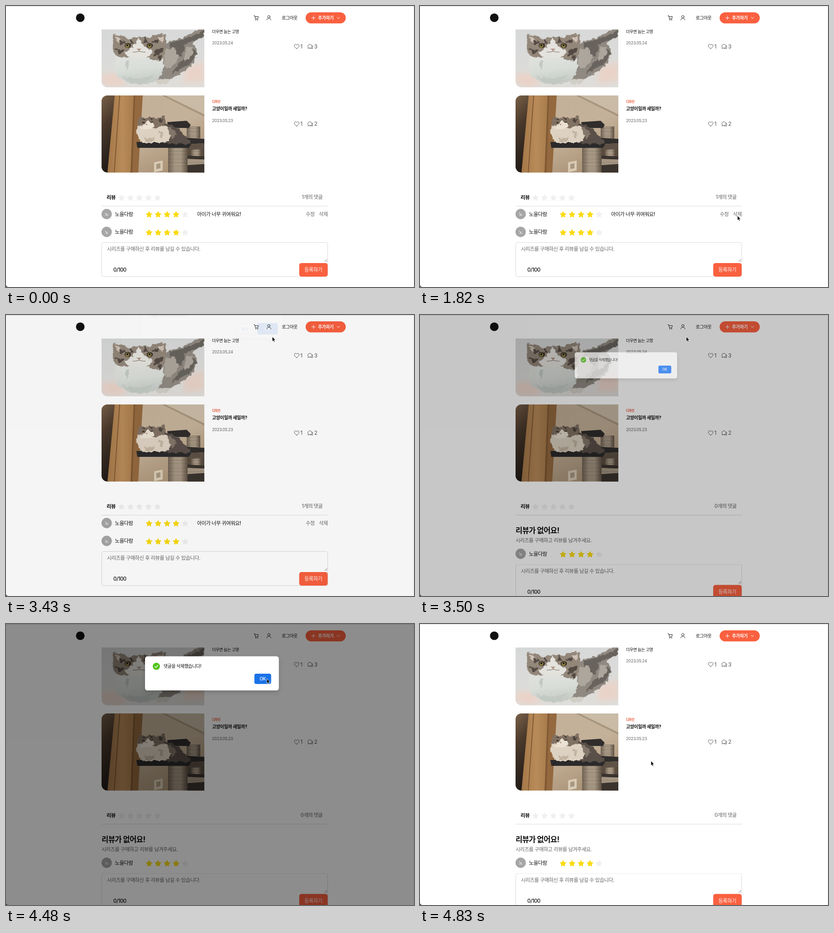
An HTML page that plays this animation: 901 by 622 pixels, repeating every 4900 ms.

```html
<!DOCTYPE html>
<html lang="ko">
<head>
<meta charset="utf-8">
<title>리뷰 삭제</title>
<style>
  html, body { margin: 0; width: 100%; height: 100%; overflow: hidden; background: #fff; }
  svg { display: block; width: 901px; height: 622px; }
  text {
    font-family: Inter, "Noto Sans CJK KR", "Noto Sans CJK", sans-serif;
    font-size: 11.2px; letter-spacing: -.04em; fill: #111; white-space: pre;
  }
  .m { font-weight: 500; }
  .b { font-weight: 700; }
  .mid { text-anchor: middle; }
  .end { text-anchor: end; }
  .grey { fill: #666; }
  .pale { fill: #959595; }
  .white { fill: #fff; }
  .coral { fill: #f9603f; }
  .tag { fill: #e8502f; font-size: 6.9px; }
  .date { font-size: 9.2px; }
  .count { font-size: 12px; fill: #555; }
  .name { font-size: 11.4px; }
  .initial { font-size: 9.6px; }
  .icon { fill: none; stroke: #555; stroke-width: 1; stroke-linecap: round; stroke-linejoin: round; }
  .star { stroke-width: 1.7; stroke-linejoin: round; }

  .before, .after, .form, .prompt, .mask, .modal, .press, .cursor {
    animation: 4900ms step-end infinite;
  }
  .before { animation-name: leave; }
  .after { animation-name: arrive; }
  .form { animation-name: drop; }
  .prompt { animation-name: prompt; }
  .mask { animation-name: mask; }
  .modal { animation-name: zoom; transform-origin: 455px 118px; }
  .press { animation-name: press; }
  .cursor { animation-name: cursor; }

  @keyframes leave { 0% { opacity: 1 } 71.42%, 100% { opacity: 0 } }
  @keyframes arrive { 0% { opacity: 0 } 71.42%, 100% { opacity: 1 } }
  @keyframes drop { 0% { transform: none } 71.42%, 100% { transform: translateY(28.5px) } }
  @keyframes prompt {
    0% { opacity: 0 } 39.99% { opacity: .6 } 41.42% { opacity: 1 }
    68.57% { opacity: .5 } 69.99% { opacity: .1 } 71.42%, 100% { opacity: 0 }
  }
  @keyframes mask {
    0% { opacity: 0 } 69.99% { opacity: .04 } 71.42% { opacity: .22 } 72.85% { opacity: .41 }
    74.28% { opacity: .45 } 92.85% { opacity: .344 } 94.28% { opacity: .187 }
    95.71% { opacity: .03 } 97.14%, 100% { opacity: 0 }
  }
  @keyframes zoom {
    0% { opacity: 0; transform: scale(.2) }
    71.42% { opacity: .7; transform: scale(.765) }
    72.85% { opacity: 1; transform: scale(.966) }
    74.28% { opacity: 1; transform: none }
    92.85% { opacity: .92; transform: scale(.935) }
    94.28% { opacity: .21; transform: scale(.366) }
    95.71% { opacity: .01; transform: scale(.205) }
    97.14%, 100% { opacity: 0; transform: scale(.2) }
  }
  @keyframes press { 0% { fill: #1677ff } 89.99%, 100% { fill: #1a72e8 } }
  @keyframes cursor {
    0% { opacity: 0; transform: translate(520px, 622px) }
    21.42% { opacity: 1; transform: translate(520px, 612px); animation-timing-function: steps(5) }
    28.57% { opacity: 1; transform: translate(703px, 453px); animation-timing-function: steps(2) }
    31.42% { opacity: 1; transform: translate(701px, 464px) }
    38.57% { opacity: 1; transform: translate(701px, 464px); animation-timing-function: steps(6) }
    47.14% { opacity: 1; transform: translate(613px, 80px) }
    48.57% { opacity: 1; transform: translate(613px, 75px) }
    51.42% { opacity: 1; transform: translate(613px, 75px); animation-timing-function: steps(7) }
    61.42% { opacity: 1; transform: translate(580px, 34px) }
    67.14% { opacity: 1; transform: translate(580px, 34px); animation-timing-function: steps(2) }
    69.99% { opacity: 1; transform: translate(588px, 48px) }
    77.14% { opacity: 1; transform: translate(588px, 48px); animation-timing-function: steps(5) }
    84.28% { opacity: 1; transform: translate(576px, 121px) }
    94.28% { opacity: 1; transform: translate(576px, 122px); animation-timing-function: steps(2) }
    97.14% { opacity: 1; transform: translate(551px, 164px) }
    98.57%, 100% { opacity: 1; transform: translate(510px, 303px) }
  }
</style>
</head>
<body>
<svg viewBox="0 0 901 622">
  <defs>
    <path id="star" d="M0-6 1.9-2.2 6-1.7 3 1.3 3.7 5.4 0 3.4-3.7 5.4-3 1.3-6-1.7-1.9-2.2Z"/>
    <path id="heart" class="icon" d="M0 5C-3 2.6-5.2.9-5.2-1.7-5.2-5.2-1.2-5.7 0-2.9 1.2-5.7 5.2-5.2 5.2-1.7 5.2.9 3 2.6 0 5Z"/>
    <g id="chat" class="icon">
      <path d="M-5 4.2-4.5 2.2A4.5 4.3 0 1 1-2.4 3.7Z"/>
      <path d="M4-2.2A3.6 3.6 0 0 1 4.8 2.7L5 5 3 4.2A4.2 4 0 0 1-1.2 3.7"/>
    </g>
    <pattern id="rope" width="4" height="3.4" patternUnits="userSpaceOnUse">
      <path fill="#c3b39c" d="M0 0H4V3.4H0Z"/><path fill="#75675a" d="M0 2H4V3.4H0Z"/>
    </pattern>
    <linearGradient id="round">
      <stop stop-color="#30251b" stop-opacity=".45"/><stop offset=".35" stop-color="#30251b" stop-opacity="0"/>
      <stop offset=".65" stop-color="#30251b" stop-opacity="0"/><stop offset="1" stop-color="#30251b" stop-opacity=".6"/>
    </linearGradient>
    <linearGradient id="paper" x2=".2" y2="1">
      <stop stop-color="#d6d8d8"/><stop offset="1" stop-color="#deddda"/>
    </linearGradient>
    <linearGradient id="door" x2=".2" y2="1">
      <stop stop-color="#7a6149"/><stop offset=".4" stop-color="#4b3a2c"/><stop offset="1" stop-color="#211b17"/>
    </linearGradient>
    <linearGradient id="wood">
      <stop stop-color="#a47748"/><stop offset=".55" stop-color="#b98b59"/><stop offset="1" stop-color="#a67a4b"/>
    </linearGradient>
    <linearGradient id="wall" x2=".6" y2="1">
      <stop stop-color="#c3b098"/><stop offset=".6" stop-color="#c4b199"/><stop offset="1" stop-color="#ab9478"/>
    </linearGradient>
    <linearGradient id="belly" y2="1" x2=".2">
      <stop stop-color="#e2e3df"/><stop offset=".6" stop-color="#d9ddd8"/><stop offset="1" stop-color="#c6cbc6"/>
    </linearGradient>
    <clipPath id="clipA"><path d="M211 52H438V180H224A13 13 0 0 1 211 167Z"/></clipPath>
    <clipPath id="clipB"><path d="M438 198V368.500H224A13 13 0 0 1 211 355.500V211A13 13 0 0 1 224 198Z"/></clipPath>
    <filter id="soft" x="-20%" y="-30%" width="140%" height="170%">
      <feDropShadow dx="0" dy="4" stdDeviation="5" flood-opacity=".16"/>
    </filter>
    <filter id="haze"><feGaussianBlur stdDeviation="6"/></filter>
    <!-- ragged, slightly blurred edges for fur -->
    <filter id="fur">
      <feTurbulence type="fractalNoise" baseFrequency=".14" numOctaves="2" seed="4"/>
      <feDisplacementMap in="SourceGraphic" scale="9" xChannelSelector="R" yChannelSelector="G"/>
      <feGaussianBlur stdDeviation=".6"/>
    </filter>
  </defs>

  <path fill="#fff" d="M0 0H901V622H0Z"/>

  <!-- header -->
  <circle cx="164" cy="26" r="9.500" fill="#111"/>
  <g class="icon" style="stroke:#222">
    <path d="M547.500 21.500H549.500L550.800 28.500H556L557.300 23.500H550"/>
    <circle cx="551.500" cy="30.800" r=".6"/><circle cx="555.500" cy="30.800" r=".6"/>
    <circle cx="580.500" cy="23.800" r="2.700"/><path d="M576 31C576.300 25.500 584.700 25.500 585 31"/>
  </g>
  <text class="m" x="609" y="29.600" style="font-size:9.900px">로그아웃</text>
  <rect class="coral" x="661.700" y="14" width="88.600" height="24.600" rx="12.300"/>
  <path class="icon" style="stroke:#fff" d="M675 26.300H683M679 22.300V30.300M731 24.700 734 28 737 24.700"/>
  <text class="b white" x="689" y="29.700" style="font-size:9.800px">추가하기</text>

  <!-- painted cat -->
  <g clip-path="url(#clipA)">
    <path fill="url(#paper)" d="M211 52H438V180H211Z"/>
    <path fill="#e9d3c8" filter="url(#haze)" d="M211 150 246 148 268 172 240 180 211 172ZM395 138 438 122V166L392 172Z"/>
    <g filter="url(#fur)">
      <path fill="#8f8981" d="M348 92C360 72 380 76 396 68 412 62 420 52 438 48V66C426 74 416 76 412 84 428 96 424 122 404 136 388 148 368 160 346 170L330 166 346 132Z"/>
      <path fill="#68635d" d="M360 82C384 74 410 72 438 52V64C424 74 404 82 392 84 398 96 392 106 380 112L366 104ZM416 96 422 108 408 126 384 140 364 152 376 134Z"/>
      <path fill="#aca69d" d="M352 96 372 92 382 116 362 140 348 132ZM398 92 412 90 412 108 394 122Z"/>
      <path fill="url(#belly)" d="M246 108C262 98 330 102 342 116 356 134 346 160 318 171 292 178 258 170 244 152 236 138 238 118 246 108Z"/>
      <path fill="#c2c8c3" d="M256 154Q286 168 326 152 314 173 290 172 268 170 256 154ZM262 124 274 120 268 142Z"/>
      <path fill="#93877a" d="M240 106C234 94 238 80 236 64 250 63 262 68 272 73 286 67 304 67 318 71 328 62 342 60 353 64 354 84 356 104 342 120 326 124 318 110 293 109 270 112 254 120 240 106Z"/>
      <path fill="#554c44" d="M250 76 268 82 252 86ZM320 78 340 72 336 84ZM274 70 284 84 274 82ZM306 68 314 82 302 82ZM240 94 262 99 250 107ZM328 98 348 92 340 108 328 112ZM334 112 346 108 340 122Z"/>
      <path fill="#cfc1b5" d="M241 68 256 72 247 82ZM349 67 334 70 345 81Z"/>
      <path fill="#e4e2dd" d="M293 70C298 84 308 92 324 100 316 120 270 118 262 104 278 94 288 84 293 70Z"/>
      <path fill="#d1cec6" d="M328 164Q345 157 361 163 360 174 341 174 330 174 328 164Z"/>
    </g>
    <ellipse cx="269" cy="87.500" rx="7" ry="5.500" fill="#3a332c"/><ellipse cx="317.500" cy="87.500" rx="7" ry="5.500" fill="#3a332c"/>
    <circle cx="268" cy="88" r="4.200" fill="#96883f"/><circle cx="317" cy="88" r="4.200" fill="#96883f"/>
    <circle cx="268" cy="87" r="2.200" fill="#1d1a17"/><circle cx="317" cy="87" r="2.200" fill="#1d1a17"/>
    <path fill="#b48c7e" d="M288 94.500H299L294 99Z"/>
    <path fill="none" stroke="#6f655d" d="M294 98V100Q286 103 280 102M294 100Q302 103 308 102"/>
  </g>
  <text class="m" x="455" y="60" style="font-size:9px">더우면 눕는 고영</text>
  <text class="grey date" x="455" y="85.300">2023.05.24</text>

  <!-- cat on a tower -->
  <g clip-path="url(#clipB)">
    <path fill="url(#wall)" d="M211 198H438V369H211Z"/>
    <path fill="#c9bba6" d="M352 198H438V240Z"/>
    <path fill="#a8967e" d="M344 198H352L438 240V245Z"/>
    <path fill="url(#door)" d="M211 198H241L227 369H211Z"/>
    <path fill="url(#wood)" d="M240 198H284L277 369H224Z"/>
    <path fill="#94693f" d="M284 198H302L292 369H277Z"/>
    <path fill="#7f5833" d="M282 198H285L279 369H275ZM250 198H252L240 369H238Z"/>
    <path fill="#d8cab4" d="M327 346 346 342V364L327 368Z"/><path fill="#a8967f" d="M332 350 341 348V359L332 361Z"/>
    <path fill="#5a4c3f" d="M401 314H438V369H401Z"/>
    <path fill="url(#rope)" d="M399 267H429V293H399ZM409 312H431V333H409ZM358 312H401V369H358ZM401 338H438V352H401Z"/>
    <path fill="url(#round)" d="M399 267H429V293H399Z"/>
    <path fill="url(#round)" d="M409 312H431V333H409Z"/>
    <path fill="url(#round)" d="M358 312H401V369H358Z"/>
    <path fill="#302d2c" d="M356 257 399 254 408 263 404 270H358ZM396 292 438 294V304L396 306Z"/>
    <path fill="#5e5145" d="M401 306 438 304V317L404 318Z"/>
    <path fill="#3a332e" d="M401 331 438 333V340L401 338ZM401 352 438 350V369H401Z"/>
    <path fill="#2b2a2b" d="M288 301 400 298 409 306 404 314 290 314Z"/>
    <g filter="url(#fur)">
      <path fill="#5a5048" d="M338 262C366 256 384 272 394 288 406 292 414 304 400 306L345 304Z"/>
      <path fill="#83766a" d="M348 268 364 268 378 284 366 294Z"/>
      <path fill="#ddd2c2" d="M291 262C286 276 288 292 302 302L350 302C370 296 366 274 348 263Z"/>
      <path fill="#807163" d="M290 264C287 254 294 249 297 243L307 249C318 246 330 247 339 249L351 243C353 255 354 261 345 266 328 272 302 272 290 264Z"/>
      <path fill="#4d443c" d="M299 251 309 249 306 255ZM335 250 348 249 342 261ZM316 247 322 252 326 248Z"/>
      <path fill="#eae1d3" d="M315 250C318 257 326 260 328 265 324 276 300 277 295 268 303 262 310 257 315 250Z"/>
      <path fill="#c2b4a1" d="M304 288Q316 298 330 288L322 301H308ZM336 276 350 280 344 296Z"/>
    </g>
    <path stroke="#2b241f" stroke-width="1.800" d="M301 257.500 306 258.500M319 257.500 325 257"/>
    <path fill="#a87766" d="M308 261.500H313L310.500 264Z"/>
  </g>
  <text class="b tag" x="455" y="214">디자인</text>
  <text class="b" x="455" y="231" style="font-size:10px">고양이일까 새일까?</text>
  <text class="grey date" x="455" y="257">2023.05.23</text>

  <use href="#heart" x="642" y="89.500"/><use href="#chat" x="672" y="89.500"/>
  <text class="count" x="650" y="93.600">1</text><text class="count" x="680.500" y="93.600">3</text>
  <use href="#heart" x="642" y="261"/><use href="#chat" x="672" y="261"/>
  <text class="count" x="650" y="265">1</text><text class="count" x="680.500" y="265">2</text>

  <!-- reviews -->
  <text class="b" x="222" y="427.500" style="font-size:11.400px">리뷰</text>
  <g data-stars="0" transform="translate(255 424.500)"></g>
  <path fill="#d9d9d9" d="M211 442.500H711V443.500H211Z"/>

  <g class="before">
    <text class="b pale end" x="699" y="427">1개의 댓글</text>
    <circle cx="222.300" cy="460.500" r="11.400" fill="#a6a6a6"/>
    <text class="m white mid initial" x="222.300" y="464">노</text>
    <text class="m name" x="240.500" y="464.500">노을다람</text>
    <g data-stars="4" transform="translate(316 461.500)"></g>
    <text class="m" x="422" y="464.500">아이가 너무 귀여워요!</text>
    <text class="grey" x="662" y="464.500">수정</text>
    <text class="grey" x="691" y="464.500">삭제</text>
  </g>
  <g class="after">
    <text class="b pale end" x="699" y="427">0개의 댓글</text>
    <text class="b" x="211" y="482.500" style="font-size:16.700px">리뷰가 없어요!</text>
    <text class="grey" x="211" y="503">시리즈를 구매하고 리뷰를 남겨주세요.</text>
  </g>

  <g class="form">
    <circle cx="222.300" cy="500" r="11.400" fill="#a6a6a6"/>
    <text class="m white mid initial" x="222.300" y="503.500">노</text>
    <text class="m name" x="240.500" y="504">노을다람</text>
    <g data-stars="4" transform="translate(316 501.500)"></g>
    <rect x="211.500" y="523.500" width="499" height="75.500" rx="4" fill="none" stroke="#d9d9d9"/>
    <text class="grey" x="223" y="542">시리즈를 구매하신 후 리뷰를 남길 수 있습니다.</text>
    <path stroke="#666" stroke-width=".8" d="M703.500 566 709 560.500M706.500 566 709 563.500"/>
    <text class="m name" x="237" y="588">0/100</text>
    <rect class="coral" x="647.500" y="569" width="62.800" height="30" rx="5"/>
    <text class="m white" x="659" y="588">등록하기</text>
  </g>

  <path class="mask" d="M0 0H901V622H0Z"/>

  <!-- browser prompt -->
  <g class="prompt">
    <rect x="299" y="-70" width="313" height="121" rx="6" fill="#fff" filter="url(#soft)"/>
    <text x="314" y="3.500" style="font-size:8.500px;fill:#444">댓글을 삭제하시겠습니까?</text>
    <rect x="507.500" y="18.500" width="43" height="24" rx="3" fill="#fff" stroke="#dadce0"/>
    <text class="m mid" x="528" y="33.500" style="font-size:8.500px;fill:#1a73e8">취소</text>
    <rect x="555" y="18" width="45" height="25" rx="3" fill="#1a73e8"/>
    <text class="m mid white" x="577" y="33.500" style="font-size:8.500px">확인</text>
  </g>

  <!-- result dialog -->
  <g class="modal">
    <rect x="307" y="71.500" width="295.500" height="75.500" rx="5.500" fill="#fff" filter="url(#soft)"/>
    <circle cx="332" cy="93.700" r="7.900" fill="#52c41a"/>
    <path class="icon" style="stroke:#fff;stroke-width:1.400" d="M328.700 93.800 331.200 96.300 335.500 91.300"/>
    <text class="m" x="348" y="97.300" style="font-size:9.900px">댓글을 삭제했습니다!</text>
    <rect class="press" x="548.500" y="110" width="37" height="22.700" rx="4"/>
    <text class="m white mid" x="566.800" y="125" style="font-size:10px">OK</text>
  </g>

  <!-- window edge -->
  <path fill="#000" fill-opacity=".16" d="M0 0H901V1H0Z"/>
  <path fill="#000" fill-opacity=".08" d="M900 1H901V622H900Z"/>
  <path fill="#333" d="M0 617Q.5 621.500 5 622H0Z"/>

  <path class="cursor" fill="#000" stroke="#fff" stroke-width=".8" d="M0 0V10.500L2.300 8.400 3.900 12 5.600 11.300 4.100 7.700H7.200Z"/>
</svg>
<script>
  for (const row of document.querySelectorAll('[data-stars]')) {
    const score = +row.dataset.stars;
    for (let i = 0; i < 5; i++) {
      const star = document.createElementNS('http://www.w3.org/2000/svg', 'use');
      const color = i < score ? '#fadb14' : '#f0f0f0';
      star.setAttribute('href', '#star');
      star.setAttribute('x', i * 19.85);
      star.setAttribute('class', 'star');
      star.setAttribute('fill', color);
      star.setAttribute('stroke', color);
      row.append(star);
    }
  }
</script>
</body>
</html>
```
